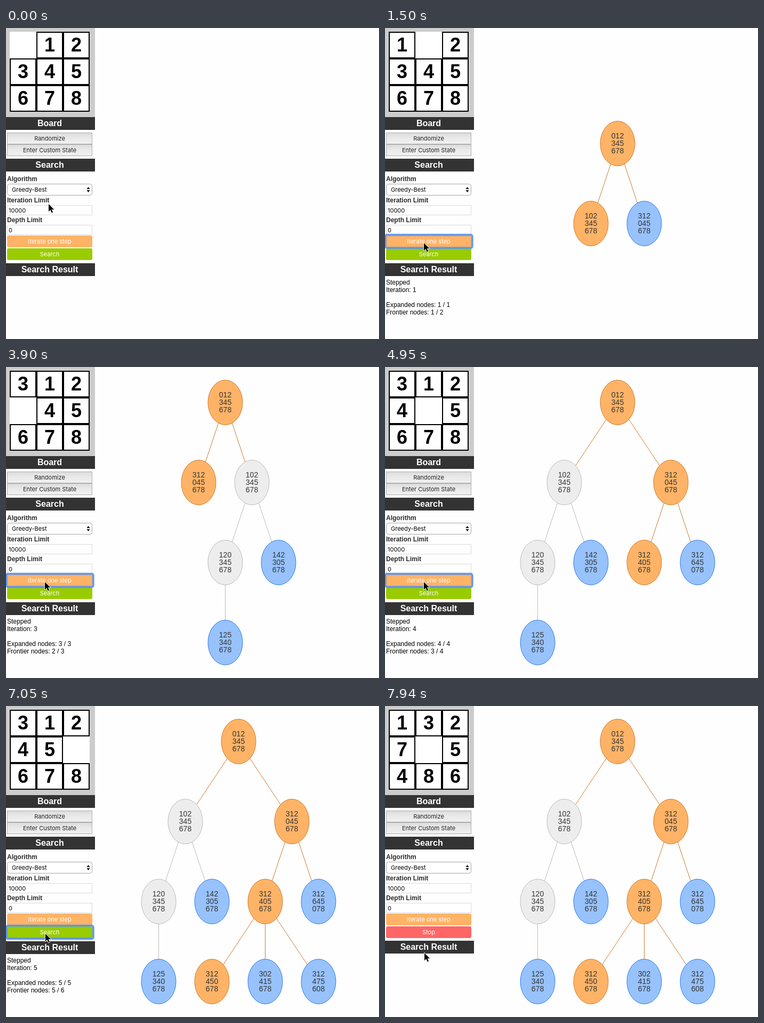
Animation of 700x583 px, one loop 8000 ms. Source, as an HTML page:

```html
<!DOCTYPE html>
<html lang="en">
<head>
<meta charset="utf-8">
<title>8-puzzle search</title>
<style>
  html, body { margin: 0; width: 100%; height: 100%; overflow: hidden; background: #fefefe; }
  svg { display: block; width: 700px; height: 583px; }
  text { font-family: "Liberation Sans", Arial, sans-serif; white-space: pre; }
  .mid { text-anchor: middle; }
  .tile { font-size: 36px; font-weight: bold; }
  .head { font-size: 16px; font-weight: bold; fill: #fff; }
  .label { font-size: 12px; font-weight: bold; fill: #2b2b2b; }
  .ui { font-family: Inter, sans-serif; font-size: 11px; }
  .plain { fill: #222; }
  .light { fill: #fff; }
  .result { font-size: 12px; }
  .node { font-size: 14px; fill: #343434; }
  .focus { fill: none; stroke: #5a93ec; }
</style>
</head>
<body>
<svg viewBox="0 0 700 583">
  <defs>
    <linearGradient id="grey" x2="0" y2="1">
      <stop offset="0" stop-color="#dcdcdc"/>
      <stop offset=".5" stop-color="#eaeaea"/>
      <stop offset="1" stop-color="#f0f0f0"/>
    </linearGradient>
  </defs>
  <g id="panel"></g>
  <g id="live"></g>
  <path id="cursor" d="M0 0V14.2L3.3 11.1L5.7 16.6L8 15.6L5.7 10.3H10.2Z"
        stroke="#fff" stroke-width="1.4" paint-order="stroke"/>
</svg>
<script>
const LOOP = 8000;
const $ = id => document.getElementById(id);

// Each entry holds from its time until the next one.
const boards = [
  [0, '012345678'], [1500, '102345678'], [2550, '120345678'], [3900, '312045678'],
  [4950, '312405678'], [6000, '312450678'], [7200, '251360487'], [7350, '512036487'],
  [7490, '512703486'], [7640, '315702486'], [7790, '321705486'], [7940, '132705486']
];
const cursorPath = [
  [0, 80, 330], [300, 72, 374], [450, 72, 396], [600, 72.5, 403.5], [900, 73, 403],
  [6450, 73.5, 423], [6600, 74, 430], [6750, 74, 432], [6900, 74, 428], [7050, 74, 427],
  [7490, 74, 432], [7640, 74, 440], [7790, 74, 445], [7940, 74, 463]
];
const steps = [[0, 0], [1500, 1], [2550, 2], [3900, 3], [4950, 4], [6000, 5]];
const frontier = ['', '1 / 2', '2 / 3', '2 / 3', '3 / 4', '5 / 6'];

const colours = {
  o: ['#ffb366', '#cc7a2b'],
  b: ['#97c2fc', '#2b7ce9'],
  g: ['#ededed', '#bbbbbb']
};

// Node: state, colour, column, level, index of parent.
const wide = [
  ['012345678', 'o', 436.5, 0], ['102345678', 'g', 336.5, 1, 0], ['312045678', 'o', 536.5, 1, 0],
  ['120345678', 'g', 286.5, 2, 1], ['142305678', 'b', 386.5, 2, 1],
  ['312405678', 'o', 486.5, 2, 2], ['312645078', 'b', 586.5, 2, 2], ['125340678', 'b', 286.5, 3, 3]
];
const trees = [
  { top: 0, nodes: [] },
  { top: 216.5, nodes: [
    ['012345678', 'o', 436.5, 0], ['102345678', 'o', 386.5, 1, 0], ['312045678', 'b', 486.5, 1, 0]] },
  { top: 141.5, nodes: [
    ['012345678', 'o', 461.5, 0], ['102345678', 'o', 411.5, 1, 0], ['312045678', 'b', 511.5, 1, 0],
    ['120345678', 'o', 361.5, 2, 1], ['142305678', 'b', 461.5, 2, 1]] },
  { top: 66.5, nodes: [
    ['012345678', 'o', 411.5, 0], ['312045678', 'o', 361.5, 1, 0], ['102345678', 'g', 461.5, 1, 0],
    ['120345678', 'g', 411.5, 2, 2], ['142305678', 'b', 511.5, 2, 2], ['125340678', 'b', 411.5, 3, 3]] },
  { top: 66.5, nodes: wide },
  { top: 66.5, nodes: [...wide,
    ['312450678', 'o', 386.5, 3, 5], ['302415678', 'b', 486.5, 3, 5], ['312475608', 'b', 586.5, 3, 5]] }
];

const at = (track, t) => track.filter(key => key[0] <= t).pop();
const text = (x, y, cls, s) => `<text x="${x}" y="${y}" class="${cls}">${s}</text>`;
const rect = (x, y, w, h, fill, more = '') =>
  `<rect x="${x}" y="${y}" width="${w}" height="${h}" fill="${fill}" ${more}/>`;
const header = (y, s) => rect(0, y, 167, 24, '#333') + text(82, y + 17, 'head mid', s);
const greyButton = (y, s) =>
  rect(2.5, y + .5, 159, 21, 'url(#grey)', 'stroke="#adadad"') + text(82, y + 15, 'ui plain mid', s);
const button = (y, fill, s) =>
  rect(2, y, 160, 22, fill, 'rx="3"') + text(82, y + 15, 'ui light mid', s);
const input = (y, s) =>
  rect(2.5, y + .5, 159, 18, '#fff', 'stroke="#dadada"') + text(5, y + 14, 'ui', s);
const focusRing = y => [[6, .25], [3, 1]].map(([w, a]) =>
  rect(.8, y - 1.2, 162.9, 24.4, 'none', `class="focus" rx="3" stroke-width="${w}" opacity="${a}"`)).join('');

function drawBoard(state) {
  return [...state].map((digit, i) => {
    const x = 7 + i % 3 * 50, y = 7 + Math.floor(i / 3) * 50;
    return digit === '0' ? rect(x, y, 50, 50, '#fff') :
      rect(x + 1, y + 1, 48, 48, '#fff', 'stroke="#000" stroke-width="2"') +
      text(x + 25, y + 37, 'tile mid', digit);
  }).join('');
}

function drawTree({ top, nodes }) {
  const yOf = node => top + node[3] * 150;
  const edges = nodes.slice(1).map(node => {
    const parent = nodes[node[4]];
    return `<path d="M${parent[2]} ${yOf(parent)}L${node[2]} ${yOf(node)}" stroke="${colours[parent[1]][1]}"/>`;
  });
  const ovals = nodes.map(node => {
    const [state, colour, x] = node, y = yOf(node), [fill, line] = colours[colour];
    return `<ellipse cx="${x}" cy="${y}" rx="32.5" ry="42" fill="${fill}" stroke="${line}"/>` +
      [0, 1, 2].map(r => text(x, y - 9.5 + r * 14, 'node mid', state.substr(r * 3, 3))).join('');
  });
  return edges.concat(ovals).join('');
}

function drawResult(n) {
  return ['Stepped', `Iteration: ${n}`, '', `Expanded nodes: ${n} / ${n}`, `Frontier nodes: ${frontier[n]}`]
    .map((line, i) => text(2, 481 + i * 14, 'result', line)).join('');
}

const spinner = rect(147.5, 371.5, 9, 14, '#f4f4f4', 'rx="3" stroke="#b5b5b5"') +
  '<path d="M149.5 377L152 374L154.5 377ZM149.5 380L152 383L154.5 380Z" fill="#444"/>';

function scene(t) {
  const step = at(steps, t)[1], running = t >= 7200;
  let out = drawBoard(at(boards, t)[1]) + drawTree(trees[step]);
  out += button(413, running ? '#ff6666' : '#99cc00', running ? 'Stop' : 'Search');
  out += header(running ? 440 : 441, 'Search Result');
  if (step && !running) out += drawResult(step);
  if (t >= 300 && t < 450) out += spinner;
  if (t >= 1350 && !running) out += focusRing(t < 7050 ? 389 : 413);
  return out;
}

$('panel').innerHTML =
  rect(0, 0, 167, 167, '#ccc') +
  header(167, 'Board') + greyButton(196, 'Randomize') + greyButton(218, 'Enter Custom State') +
  header(245, 'Search') + text(2, 287, 'label', 'Algorithm') +
  rect(2.5, 292.5, 159, 21, '#fff', 'rx="4" stroke="#a6a6a6"') + text(11, 307, 'ui', 'Greedy-Best') +
  '<path d="M151.5 302L154.5 298L157.5 302ZM151.5 304L154.5 308L157.5 304Z"/>' +
  text(2, 327, 'label', 'Iteration Limit') + input(332, '10000') +
  text(2, 364, 'label', 'Depth Limit') + input(369, '0') +
  button(389, '#ffb366', 'Iterate one step');

const start = performance.now();
let shown = '';
function tick() {
  const t = (performance.now() - start) % LOOP;
  const markup = scene(t);
  if (markup !== shown) $('live').innerHTML = shown = markup;
  const [, x, y] = at(cursorPath, t);
  $('cursor').setAttribute('transform', `translate(${x} ${y})`);
  requestAnimationFrame(tick);
}
tick();
</script>
</body>
</html>
```
